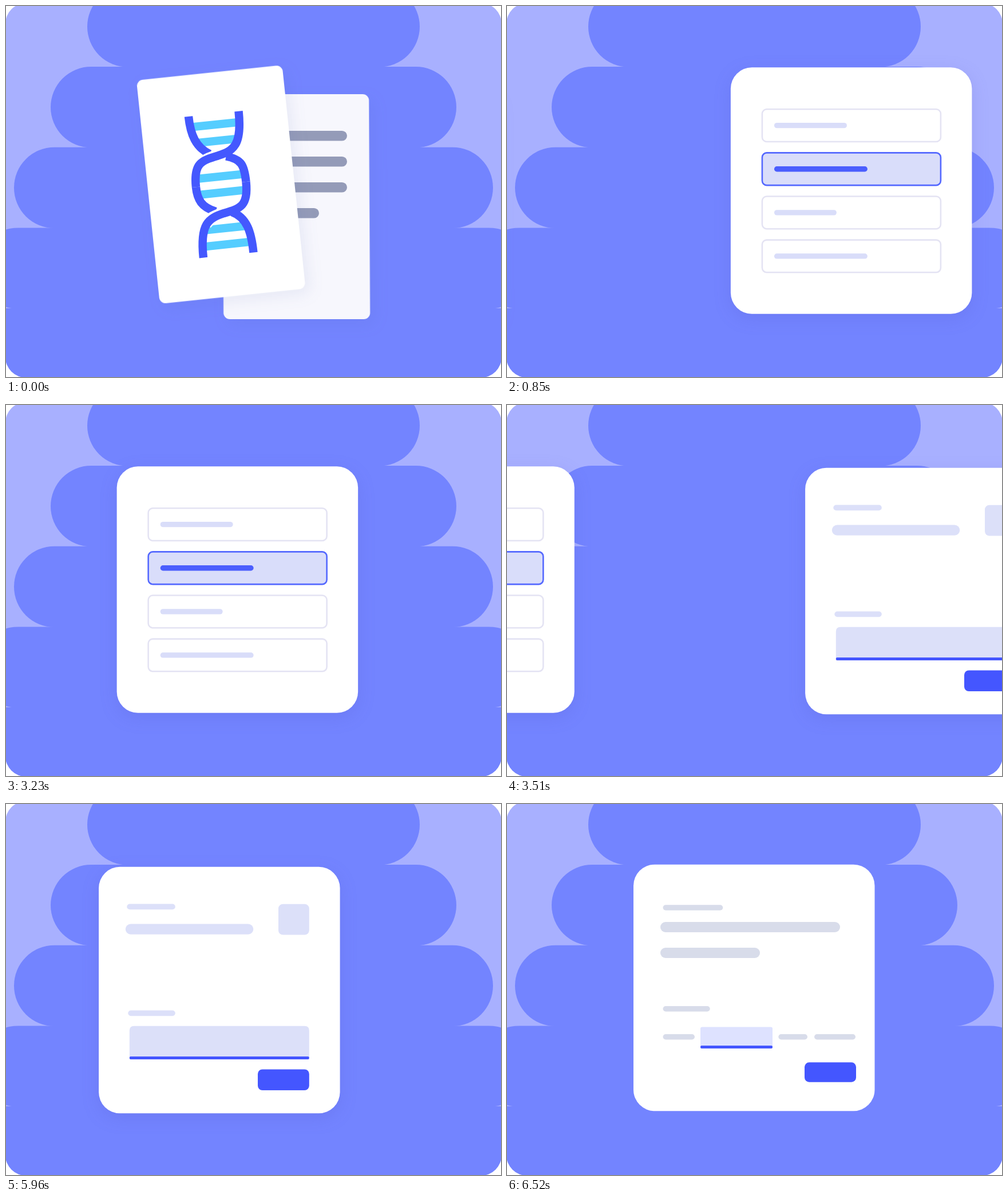
An HTML page that plays this animation: 865 px wide and 648 px high, repeating every 8000 ms.

```html
<!DOCTYPE html>
<html lang="en">
<head>
<meta charset="utf-8">
<title>Sliding cards</title>
<style>
  html, body { margin: 0; width: 100%; height: 100%; overflow: hidden; background: #fff; }
  svg { display: block; width: 100vw; height: 100vh; }
  .card { filter: drop-shadow(0 8px 14px rgba(80, 80, 190, .17)); }
  .soft { filter: drop-shadow(7px 9px 13px rgba(70, 85, 170, .09)); }
  .flat .card { filter: none; }
  .strand { fill: none; stroke: #4458fe; stroke-width: 14.5; }
  .gap { fill: none; stroke: #fff; stroke-width: 22; }
</style>
</head>
<body>
<svg viewBox="0 0 865 648" preserveAspectRatio="none">
  <clipPath id="stage"><rect x="-1" y="-5" width="867" height="654" rx="36"/></clipPath>
  <g clip-path="url(#stage)">
    <rect y="-5" width="865" height="654" fill="#a8b0ff"/>
    <g id="rows"></g>
    <g id="track"></g>
  </g>
</svg>
<script>
const BLUE = '#4456ff', PALE = '#dce0f9', GREY = '#d8dcea', SLATE = '#949bb8';

// Rounded rectangle given by its edges
const box = (x1, y1, x2, y2, r, fill, extra = '') =>
  `<rect x="${x1}" y="${y1}" width="${x2 - x1}" height="${y2 - y1}" rx="${r}" fill="${fill}" ${extra}/>`;
const bar = (x1, y1, x2, y2, fill) => box(x1, y1, x2, y2, (y2 - y1) / 2, fill);
const card = (x, y) => box(x, y, x + 421.5, y + 430.5, 37, '#fff', 'class="card"');

function input(x1, y1, x2, y2, r, fill) {
  return `<path d="M${x1} ${y2 - 3}V${y1 + r}q0 ${-r} ${r} ${-r}H${x2 - r}q${r} 0 ${r} ${r}V${y2 - 3}z" fill="${fill}"/>`
    + box(x1, y2 - 5, x2, y2, 2, BLUE);
}

function helix() {
  const rung = (y, w) => box(-w, y - 7.2, w, y + 7.2, 0, '#55cdff');
  const line = (kind, d) => `<path class="${kind}" d="${d}"/>`;
  return [-105, -14, 14, 105].map(y => rung(y, 40)).join('') + rung(-76.5, 34) + rung(76.5, 34)
    // left strands pass behind and are cut where the front ones cross
    + line('strand', 'M-44-124C-44-92-37-69-14-55M-44 0C-44 22-38 36-14 46')
    + line('gap', 'M14-54L0-50.5C-16-47.5-27-44-34-36M14 47L0 50.5C-16 54-27 58-34 66')
    + line('strand', 'M44 0C44-30 40-40 14-48M44 124C44 88 39 62 14 50')
    + line('strand', 'M44-124C44-64 28-56.5 0-50.5C-30-45-44-42-44 0')
    + line('strand', 'M44 0C44 42 30 45 0 50.5C-28 56.5-44 64-44 124');
}

function flashcards() {
  const lines = [596, 596, 596, 547].map((end, i) => bar(440, 218 + 45 * i, end, 235.5 + 45 * i, SLATE));
  return box(377.3, 154, 633.4, 547, 11, '#f7f7fd', 'class="soft" transform="skewX(.3)"')
    + lines.join('')
    + `<g transform="translate(375.7 311.7) rotate(-6)">`
    + box(-128, -196.3, 128, 196.3, 11, '#fff', 'class="soft"') + helix() + '</g>';
}

function choices() {
  return card(221, 107.3) + [424, 460, 406, 460].map((end, i) => {
    const y = 180.3 + 76.1 * i, on = i === 1;
    return box(276, y, 588, y + 56.7, 8, on ? '#d9ddfa' : '#fff',
        `stroke="${on ? '#5468ff' : '#e4e3f3'}" stroke-width="2.6"`)
      + bar(297, y + 23.7, end, y + 33, on ? '#4b5efe' : '#d9ddf9');
  }).join('');
}

function answer() {
  return card(221.8, 109.8)
    + bar(271, 174.5, 355.5, 184.3, PALE) + bar(268.5, 209.5, 492, 227.7, PALE)
    + box(535.7, 174.7, 589.5, 228.5, 8, PALE) + bar(273, 360.5, 355.5, 370.2, PALE)
    + input(275.5, 387.7, 589.5, 446, 8, PALE) + box(499.7, 463.5, 589.5, 500, 8, BLUE);
}

function blanks() {
  return card(221, 105.7)
    + bar(272.5, 176.3, 377.3, 185.7, GREY) + bar(268, 206, 582, 224, GREY) + bar(268, 251, 442, 269, GREY)
    + bar(272.5, 353, 354.7, 362.5, GREY)
    + [[272.5, 328], [474.3, 525], [537, 609]].map(([a, b]) => bar(a, 402, b, 411.5, GREY)).join('')
    + input(338, 389.5, 464, 427, 3, '#dee2ff') + box(520, 451.3, 610, 485.7, 8, BLUE);
}

// Rows overlap a little so that no seam shows between them
let rows = '';
for (let i = 0; i < 5; i++)
  rows += bar(142 - 64 * i, 140.7 * i - 34.7, 723 + 64 * i, 140.7 * i + 106.7, '#7384ff');
document.getElementById('rows').innerHTML = rows;

const GAP = 824, LOOP = 8000, STEP = 70, SLIDE = 620;
const track = document.getElementById('track');
track.innerHTML = [flashcards, choices, answer, blanks]
  .map((draw, i) => `<g transform="translate(${i * GAP})">${draw()}</g>`).join('');

// Each move: first visible step, and how far the slide has run by then
const moves = [[500, 75], [3230, 80], [5960, 117]];

// cubic-bezier(.42, 0, .58, 1)
function ease(x) {
  let lo = 0, hi = 1;
  for (let i = 0; i < 24; i++) {
    const s = (lo + hi) / 2, r = 1 - s;
    if (1.26 * s * r * r + 1.74 * s * s * r + s * s * s < x) lo = s; else hi = s;
  }
  return lo * lo * (3 - 2 * lo);
}

function frame(now) {
  const t = now % LOOP;
  let pos = 0;
  for (const [start, lead] of moves) {
    if (t < start) break;
    const x = (Math.floor((t - start) / STEP) * STEP + lead) / SLIDE;
    pos += x < 1 ? ease(x) : 1;
  }
  track.setAttribute('transform', `translate(${(-GAP * pos).toFixed(2)})`);
  track.classList.toggle('flat', pos === 2 || pos === 3);
  requestAnimationFrame(frame);
}
frame(0);
</script>
</body>
</html>
```
